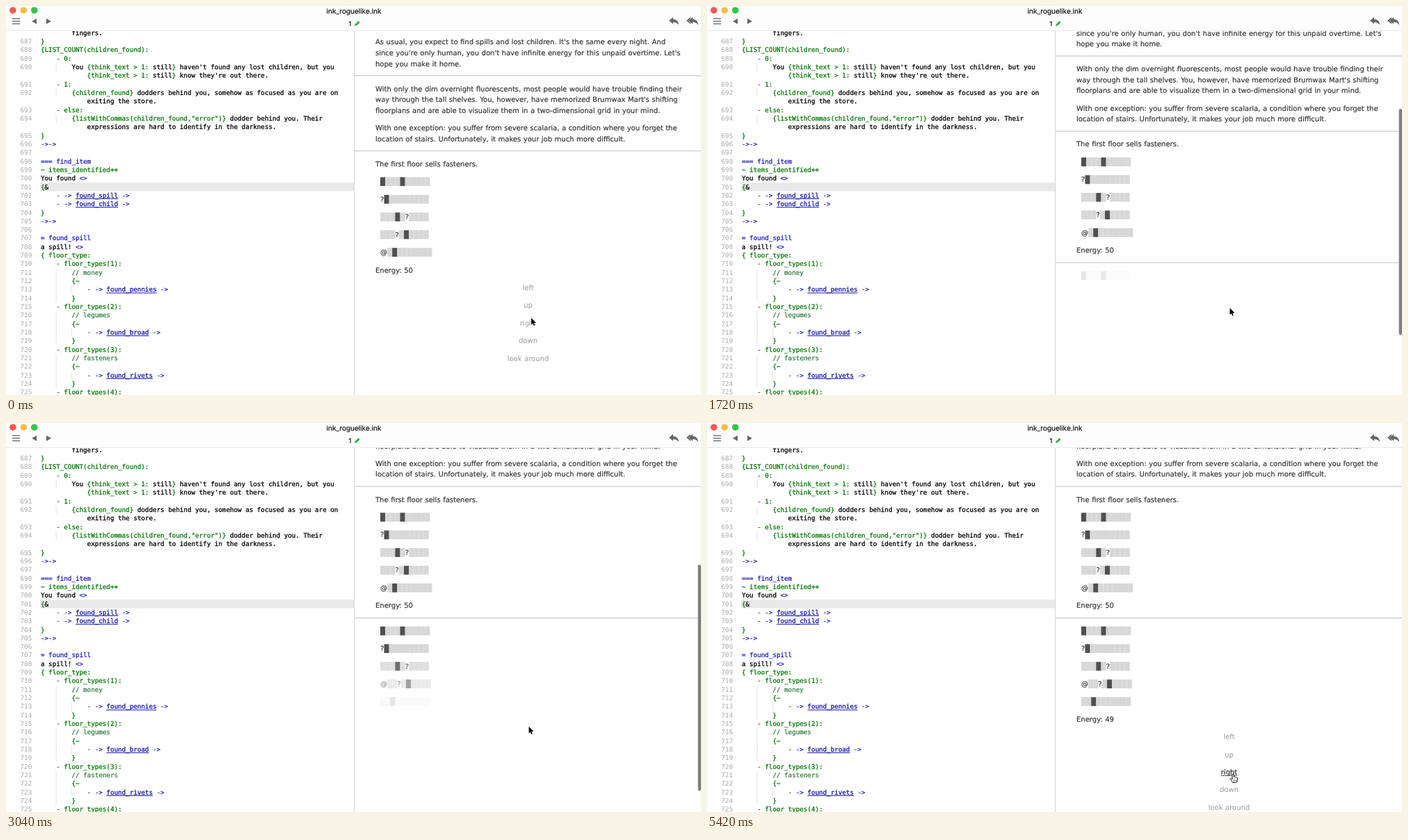
Animation, 999 px wide and 560 px high, one loop 5.44 s. Source, as an HTML page with a canvas:

```html
<!DOCTYPE html>
<html lang="en">
<head>
<meta charset="utf-8">
<title>Ink editor</title>
<style>
html, body { margin: 0; width: 100%; height: 100%; overflow: hidden; background: #fff; }
canvas { display: block; width: 999px; height: 560px; }
</style>
</head>
<body>
<canvas id="stage" width="999" height="560"></canvas>
<script>
const ctx = document.getElementById('stage').getContext('2d');
const LOOP = 5440, CLICK = 1480, SCROLL_AT = 1540, SCROLL_MS = 550, SCROLL_PX = 117.2;
const MONO = '9.22px "DejaVu Sans Mono", monospace';
const SANS = '10.03px "DejaVu Sans", sans-serif';
const COL = 5.55, ROW = 12.33, TOP = 36;
const INK = '#363636', GREY = 170;

// Code: [number, indent, text]; § switches colour: g green, k black, b blue, l link, c comment
const COLORS = { g: '#067a06', k: '#000', b: '#2020b8', l: '#1414a8', c: '#3a8049' };
const divert = name => '§g- §b-> §l' + name + '§b ->';
const floor = (n, note, item) => [
  [0, 4, `§g- floor_types(${n}):`],
  [0, 8, '§c// ' + note],
  [0, 8, '§g{~'],
  [0, 12, divert(item)],
  [0, 8, '§g}']
];
const code = [
  ['', 8, '§kfingers.'],
  [0, 0, '§g}'],
  [0, 0, '§g{LIST_COUNT(children_found):'],
  [0, 4, '§g- 0:'],
  [0, 8, "§kYou §g{think_text > 1:§k still§g}§k haven't found any lost children, but you"],
  ['', 12, "§g{think_text > 1:§k still§g}§k know they're out there."],
  [0, 4, '§g- 1:'],
  [0, 8, '§g{children_found}§k dodders behind you, somehow as focused as you are on'],
  ['', 12, '§kexiting the store.'],
  [0, 4, '§g- else:'],
  [0, 8, '§g{listWithCommas(children_found,"error")}§k dodder behind you. Their'],
  ['', 12, '§kexpressions are hard to identify in the darkness.'],
  [0, 0, '§g}'],
  [0, 0, '§b->->'],
  [0, 0, ''],
  [0, 0, '§b=== find_item'],
  [0, 0, '§g~ items_identified++'],
  [0, 0, '§kYou found §b<>'],
  [0, 0, '§g{§k&'],
  [0, 4, divert('found_spill')],
  [0, 4, divert('found_child')],
  [0, 0, '§g}'],
  [0, 0, '§b->->'],
  [0, 0, ''],
  [0, 0, '§b= found_spill'],
  [0, 0, '§ka spill! §b<>'],
  [0, 0, '§g{ floor_type:'],
  ...floor(1, 'money', 'found_pennies'),
  ...floor(2, 'legumes', 'found_broad'),
  ...floor(3, 'fasteners', 'found_rivets'),
  [0, 4, '§g- floor_types(4):']
];

// Story text by vertical centre
const story = [
  [51.7, "As usual, you expect to find spills and lost children. It's the same every night. And"],
  [67.3, "since you're only human, you don't have infinite energy for this unpaid overtime. Let's"],
  [82.9, 'hope you make it home.'],
  [118.9, 'With only the dim overnight fluorescents, most people would have trouble finding their'],
  [134.4, "way through the tall shelves. You, however, have memorized Brumwax Mart's shifting"],
  [150, 'floorplans and are able to visualize them in a two-dimensional grid in your mind.'],
  [175.3, 'With one exception: you suffer from severe scalaria, a condition where you forget the'],
  [190.8, 'location of stairs. Unfortunately, it makes your job much more difficult.'],
  [227, 'The first floor sells fasteners.'],
  [379.8, 'Energy: 50']
];
const STEP = 25.45;
const mapA = ['#...#.....', '?#........', '...#.?....', '...?.#....', '@.#.......'];
const mapB = ['#...#.....', '?#........', '...#.?....', '@..?.#....', '..#.......'];
const rowStart = [1600, 1890, 2170, 2520, 2910];
const choices = ['left', 'up', 'right', 'down', 'look around'];
const choiceStart = [3960, 3880, 4040, 4220, 4400];

// Pointer: [time, x, y]
const path = [
  [0, 755, 449], [120, 755, 449], [560, 751.8, 436], [900, 751.5, 434.5], [2280, 751.5, 434.8],
  [3040, 751.5, 437], [3360, 751.7, 438], [3900, 751.7, 438], [4300, 752, 441.5],
  [4560, 752.5, 444], [5060, 756, 503], [5420, 756, 505]
];

const clamp = v => Math.max(0, Math.min(1, v));
const fade = (t, start, ms) => clamp((t - start) / ms);

function pointer(t) {
  let i = 0;
  while (i < path.length - 2 && t > path[i + 1][0]) i++;
  const [t0, x0, y0] = path[i], [t1, x1, y1] = path[i + 1];
  const u = clamp((t - t0) / (t1 - t0)), e = u * u * (3 - 2 * u);
  return { x: x0 + (x1 - x0) * e, y: y0 + (y1 - y0) * e };
}

function choiceY(i, after) { return (after ? 451.5 : 405.3) + i * STEP; }

// Index of the choice under the pointer, or -1
function hovered(t) {
  if (t < 0 || (t >= CLICK && t < 4300)) return -1;
  const p = pointer(t), after = t >= CLICK;
  return choices.findIndex((c, i) => Math.abs(p.y - choiceY(i, after)) < 6.5);
}

function hoverAmount(i, t) {
  let n = 0;
  for (let k = 0; k < 10; k++) if (hovered(t - k * 20) === i) n++;
  return n / 10;
}

// A hairline stroke gives the slightly heavier smoothing of the editor's text
function text(s, x, y, font, color, align = 'left', weight = 0.2) {
  ctx.font = font;
  ctx.wordSpacing = font === SANS ? '0.34px' : '0px';
  ctx.fillStyle = ctx.strokeStyle = color;
  ctx.lineWidth = weight;
  ctx.textAlign = align;
  ctx.fillText(s, x, y);
  if (weight) ctx.strokeText(s, x, y);
}

function rect(x, y, w, h, color) {
  ctx.fillStyle = color;
  ctx.fillRect(x, y, w, h);
}

function shape(points, fill, stroke, width = 1) {
  ctx.beginPath();
  points.forEach(([x, y]) => ctx.lineTo(x, y));
  ctx.closePath();
  if (stroke) {
    ctx.lineWidth = width;
    ctx.strokeStyle = stroke;
    ctx.lineJoin = 'round';
    ctx.stroke();
  }
  ctx.fillStyle = fill;
  ctx.fill();
}

function clipTo(x, w, draw) {
  ctx.save();
  ctx.beginPath();
  ctx.rect(x, TOP, w, 560 - TOP);
  ctx.clip();
  draw();
  ctx.restore();
}

function drawCode() {
  let num = 686;
  code.forEach(([label, indent, line], r) => {
    const y = 53.9 + (r - 1) * ROW;
    if (label === 0) {
      num++;
      if (num === 701) rect(49, y - 9.2, 451, 12.2, '#e8e8e8');
      text(num, 37.2, y, MONO, '#a8a8a8', 'right', 0);
      for (let k = 4; k < indent; k += 4) rect(49.5 + k * COL, y - 9.2, 0.8, ROW, '#dedede');
    }
    let x = 50 + indent * COL;
    line.split('§').slice(1).forEach(part => {
      const kind = part[0], s = part.slice(1), w = s.length * COL;
      text(s, x, y, MONO, COLORS[kind], 'left', 0.3);
      if (kind === 'l') rect(x, y + 1.1, w, 1, COLORS.l);
      x += w;
    });
  });
}

function drawCell(x, y, w, dark) {
  const h = 12.7, top = y + 0.2 - h / 2;
  rect(x, top, w, h, dark ? '#4a4a4a' : '#e6e6e6');
  ctx.fillStyle = dark ? '#666' : '#a2a2a2';
  for (let r = 0; r < 7; r++) {
    for (let c = 0; c < 3; c++) {
      ctx.fillRect(x + (c + (r % 2 ? 0.6 : 0.1)) * w / 3, top + r * h / 7 + 0.3, 0.95, 0.95);
    }
  }
}

function drawMapRow(row, y) {
  let x = 538;
  for (const ch of row) {
    if (ch === '#' || ch === '.') {
      drawCell(x, y, 7.13, ch === '#');
      x += 7.13;
    } else {
      text(ch, x, y + 3.6, SANS, INK);
      x += ch === '@' ? 10.1 : 5.5;
    }
  }
}

function rule(y) { rect(501, y - 0.8, 498, 1.6, '#d6d6d6'); }

function drawChoice(i, y, t) {
  const v = Math.round(GREY - 130 * hoverAmount(i, t));
  text(choices[i], 750.5, y + 3.6, SANS, `rgb(${v},${v},${v})`, 'center');
  if (hovered(t) === i) {
    const w = ctx.measureText(choices[i]).width;
    rect(750.5 - w / 2, y + 4.8, w, 0.9, INK);
  }
}

function withAlpha(a, draw) {
  if (a <= 0) return;
  ctx.globalAlpha = a;
  draw();
  ctx.globalAlpha = 1;
}

function drawStory(t) {
  const scroll = SCROLL_PX * (1 - Math.cos(Math.PI * fade(t, SCROLL_AT, SCROLL_MS))) / 2;
  ctx.save();
  ctx.translate(0, -scroll);
  story.forEach(([y, s]) => text(s, 531, y + 3.7, SANS, INK));
  rule(100.3);
  rule(208.6);
  mapA.forEach((row, i) => drawMapRow(row, 252.6 + i * STEP));
  if (t >= CLICK) rule(397.8);
  ctx.restore();

  if (t < CLICK) {
    choices.forEach((c, i) => drawChoice(i, choiceY(i, false), t));
    return;
  }
  ctx.save();
  ctx.translate(0, SCROLL_PX - scroll);
  mapB.forEach((row, i) => withAlpha(fade(t, rowStart[i], 1100),
    () => drawMapRow(row, 299.1 + i * STEP)));
  withAlpha(fade(t, 3150, 690), () => text('Energy: 49', 531, 429.8, SANS, INK));
  choices.forEach((c, i) => withAlpha(fade(t, choiceStart[i], 600),
    () => drawChoice(i, choiceY(i, true), t)));
  ctx.restore();

  withAlpha(fade(t, SCROLL_AT, 40) * (1 - fade(t, 3080, 260)), () => {
    ctx.fillStyle = '#7f7f7f';
    ctx.beginPath();
    ctx.roundRect(994.6, 130 + scroll * 0.632, 4.4, 325.5, 2.2);
    ctx.fill();
  });
}

function replyArrow(x) {
  ctx.beginPath();
  ctx.moveTo(x, 21);
  ctx.lineTo(x + 6, 16);
  ctx.lineTo(x + 6, 19);
  ctx.quadraticCurveTo(x + 13.5, 19, x + 14, 27.5);
  ctx.quadraticCurveTo(x + 11.5, 23.2, x + 6, 23.2);
  ctx.lineTo(x + 6, 26);
  ctx.closePath();
  ctx.fillStyle = '#666';
  ctx.fill();
}

function drawHeader() {
  rect(0, 0, 999, TOP, '#fdfdfd');
  rect(0, TOP - 0.8, 999, 0.8, '#e4e4e4');
  ['#fc5753', '#fdbc40', '#34c748'].forEach((c, i) => {
    ctx.fillStyle = c;
    ctx.beginPath();
    ctx.arc(9.9 + i * 15.4, 6.2, 4.8, 0, 7);
    ctx.fill();
  });
  text('ink_roguelike.ink', 500, 11.4, '10px Inter, sans-serif', '#111', 'center');
  text('1', 494.5, 28.6, '9.5px Inter, sans-serif', '#111', 'center');
  for (let i = 0; i < 3; i++) rect(9, 17.6 + i * 3.7, 11.2, 1.3, '#666');
  shape([[37, 22], [44, 18], [44, 26]], '#666');
  shape([[65, 22], [58, 18], [58, 26]], '#666');
  shape([[501, 29], [501.8, 26.2], [506.4, 21.6], [508.6, 23.8], [504, 28.3]], '#2fb344');
  replyArrow(953);
  shape([[978, 21], [984, 16], [984, 18.2], [980.8, 21], [984, 23.8], [984, 26]], '#666');
  replyArrow(981);
}

function drawArrow() {
  shape([[0, 0], [0, 9.8], [2.2, 7.8], [3.7, 11.2], [5.3, 10.5], [3.9, 7.2], [6.9, 7]], '#000', '#fff', 1.4);
}

function drawHand() {
  ctx.beginPath();
  ctx.moveTo(-1.2, 1);
  ctx.quadraticCurveTo(0, -0.9, 1.1, 1);
  ctx.lineTo(1.4, 4.6);
  ctx.quadraticCurveTo(2.6, 3.8, 3.4, 5);
  ctx.quadraticCurveTo(4.6, 4.4, 5.2, 5.6);
  ctx.quadraticCurveTo(6.6, 5.2, 6.7, 7);
  ctx.quadraticCurveTo(6.8, 9.6, 5.4, 12.4);
  ctx.lineTo(-0.4, 12.4);
  ctx.quadraticCurveTo(-1.6, 10, -4, 7.6);
  ctx.quadraticCurveTo(-3.6, 5.6, -0.8, 7.6);
  ctx.closePath();
  ctx.fillStyle = '#fff';
  ctx.fill();
  ctx.lineWidth = 1;
  ctx.lineJoin = 'round';
  ctx.strokeStyle = '#111';
  ctx.stroke();
  for (let i = 0; i < 3; i++) rect(0.9 + i * 1.6, 8.2, 0.6, 2.6, '#222');
}

function draw(t) {
  ctx.textRendering = 'geometricPrecision';
  ctx.lineJoin = 'round';
  rect(0, 0, 999, 560, '#fff');
  clipTo(0, 500, drawCode);
  clipTo(501, 498, () => drawStory(t));
  rect(500.2, TOP, 1, 560 - TOP, '#cfcfcf');
  drawHeader();
  const p = pointer(t);
  ctx.save();
  ctx.translate(p.x, p.y);
  if (hovered(t) >= 0) drawHand(); else drawArrow();
  ctx.restore();
}

let began;
function tick(now) {
  if (began === undefined) began = now;
  draw((now - began) % LOOP);
  requestAnimationFrame(tick);
}
draw(0);
requestAnimationFrame(tick);
</script>
</body>
</html>
```
